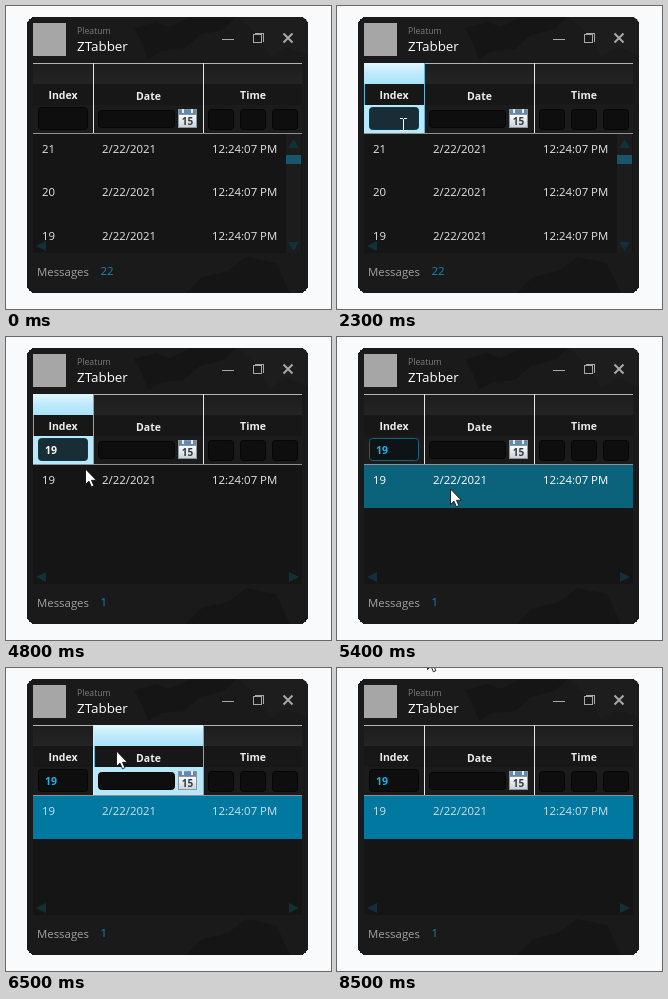
An HTML page for the animation above (8.6 s loop, 325 by 303 pixels).

```html
<!DOCTYPE html>
<html lang="en">
<head>
<meta charset="utf-8">
<title>Message log</title>
<style>
  html, body { margin: 0; width: 100%; height: 100%; overflow: hidden; background: #f9fafc; }
  svg { display: block; width: 325px; height: 303px; }
  text { font: 11.4px "Open Sans", "Noto Sans", sans-serif; fill: #e6e6e6; white-space: pre; }
  rect, .crisp { shape-rendering: crispEdges; }
  .head { font-size: 10.5px; font-weight: 700; fill: #ececec; text-anchor: middle; }
  .box { fill: #0e0e0e; stroke: #060606; shape-rendering: auto; }
  .arrow { fill: #12303a; }
  .count { fill: #1088b4; }
  #typed { font-size: 10.5px; font-weight: 700; }
</style>
</head>
<body>
<svg viewBox="0 0 325 303">
  <defs>
    <linearGradient id="top" x2="0" y2="1">
      <stop offset="0" stop-color="#e2f7ff"/>
      <stop offset=".5" stop-color="#bdeafc"/>
      <stop offset="1" stop-color="#a9e3fa"/>
    </linearGradient>
    <linearGradient id="strip" x2="0" y2="1">
      <stop offset="0" stop-color="#1d1d1d"/>
      <stop offset="1" stop-color="#242424"/>
    </linearGradient>
    <linearGradient id="page" x2="0" y2="1">
      <stop offset="0" stop-color="#fafcfd"/>
      <stop offset="1" stop-color="#ccd3d9"/>
    </linearGradient>
    <clipPath id="frame"><rect x="21" y="11" width="281" height="276" rx="8"/></clipPath>
  </defs>

  <!-- window -->
  <rect x="21" y="11" width="281" height="276" rx="8" fill="#1a1a1a"/>
  <g clip-path="url(#frame)">
    <g fill="#151515">
      <path d="M128 22l22-6 14 5 20-10h46l-12 12-24 6-16 14-22 2-14 8-6-16z"/>
      <path d="M180 287l16-16 26-6 18-14 30 6 14 30z"/>
    </g>
    <path fill="#1d1d1d" d="M232 11h70v38l-22-8-16 10-12-22z"/>
  </g>
  <rect x="27" y="17" width="33" height="33" fill="#a6a6a6"/>
  <text x="71" y="28" style="font-size:8.7px;fill:#7c7c7c">Pleatum</text>
  <text x="71" y="45" style="font-size:13.4px;fill:#fff">ZTabber</text>
  <g fill="none" stroke="#a8a8a8">
    <path class="crisp" d="M216 33.5h12"/>
    <path class="crisp" d="M247.500 28.500h8v8h-8zM249 27.500h8v8"/>
    <path d="M277.500 27.500l9 9M286.500 27.500l-9 9" stroke-width="2"/>
  </g>

  <!-- table header -->
  <rect x="27" y="57" width="269" height="190" fill="#151515"/>
  <rect x="27" y="57" width="269" height="21" fill="url(#strip)"/>
  <rect x="27" y="78" width="269" height="21" fill="#171717"/>
  <rect x="27" y="99" width="269" height="28" fill="#1b1b1b"/>
  <path class="crisp" d="M27 57.5h269" stroke="#b4b4b4"/>
  <path class="crisp" d="M27 127.5h269" stroke="#909090"/>
  <path class="crisp" d="M87.500 57v70M197.500 57v70" stroke="#e6e6e6"/>
  <g id="hoverIndex"></g>
  <g id="hoverDate"></g>
  <text class="head" x="57" y="93">Index</text>
  <text class="head" x="142.500" y="94">Date</text>
  <text class="head" x="247" y="93">Time</text>
  <rect id="field" class="box" x="32.500" y="101.500" width="49" height="22" rx="3"/>
  <rect class="box" x="92.500" y="104.500" width="76" height="17" rx="3"/>
  <rect class="box" x="202.500" y="103.500" width="25" height="20" rx="3"/>
  <rect class="box" x="234.500" y="103.500" width="25" height="20" rx="3"/>
  <rect class="box" x="266.500" y="103.500" width="25" height="20" rx="3"/>
  <g>
    <rect x="172" y="103" width="19" height="19" fill="#8d969e"/>
    <rect x="173" y="109" width="17" height="12" fill="url(#page)"/>
    <rect x="173" y="104" width="17" height="4" fill="#5f8bb3"/>
    <path class="crisp" d="M177 103v4M186 103v4" stroke="#e6ecf1" stroke-width="2"/>
    <text x="181.500" y="119" text-anchor="middle" style="font-size:10px;font-weight:700;fill:#333a42">15</text>
  </g>
  <text id="typed" x="39" y="117"></text>
  <rect id="caret" y="107" width="1" height="12" fill="#fff"/>

  <!-- list -->
  <rect id="mark" x="27" y="128" width="269" height="43"/>
  <g id="rows"></g>
  <path class="arrow" d="M40 235v10l-10-5z"/>
  <path id="right" class="arrow" d="M283 235v10l10-5z"/>
  <g id="scroll">
    <rect x="280" y="128" width="15" height="119" fill="#1c1c1c"/>
    <path class="arrow" d="M282 142h11l-5.500-9z"/>
    <path class="arrow" d="M282 236h11l-5.500 9z"/>
    <rect id="thumb" x="280" y="149" width="15" fill="#17566c"/>
  </g>
  <text x="31" y="270" style="fill:#a2a2a2">Messages</text>
  <text id="count" class="count" x="94.500" y="269"></text>

  <!-- pointers -->
  <path id="arrow" d="M.5 1v15.500l3.500-3.300 2.400 5.600 2.500-1.100-2.400-5.400h4.900z" fill="#fff" stroke="#111" stroke-width=".9"/>
  <path id="beam" class="crisp" d="M-3-5.500H0M1-5.500H4M.5-5V6M-3 6.500H0M1 6.500H4" fill="none" stroke="#fff"/>
</svg>
<script>
const LOOP = 8600, STEP = 100;
const $ = id => document.getElementById(id);
const show = (el, on) => el.style.display = on ? '' : 'none';

// Value of the last entry whose time has come
const at = (track, t) => {
  let value = track[0][1];
  for (const [time, v] of track) if (t >= time) value = v;
  return value;
};

// Pointer: x, y and whether it is a text beam
const path = [
  [0, null],
  [500, [76, 8]], [600, [75, 20]], [700, [73, 38]], [800, [71, 62]],
  [900, [69, 86]], [1000, [67, 109, 1]], [1100, [66, 118, 1]],
  [4700, [70, 123, 1]], [4800, [79, 131]], [4900, [100, 155]],
  [5100, [109, 158]], [5200, [113, 151]],
  [6200, [114, 148]], [6300, [113, 133]], [6400, [112, 112, 1]],
  [6500, [110, 82]], [6600, [108, 53]], [6700, [106, 26]],
  [6800, [104, 2]], [6900, null],
  [8100, [105, -16]], [8200, [102, -15]], [8300, [98, -15]],
  [8400, [94, -15]], [8500, [90, -15]]
];
const hover = [[0, ''], [800, 'index'], [4900, ''], [6400, 'date'], [6600, '']];
const typed = [[0, ''], [2800, '1'], [3200, '19']];
const query = [[0, ''], [2900, '1'], [3200, '19']];
const caret = [[0, 0], [1900, 1], [2300, 0], [2800, 1], [3800, 0], [4200, 1], [4700, 0]];
const rowText = [[0, '#e6e6e6'], [4900, '#fff'], [6400, '#cfe0e8']];
const rowFill = [[0, 'none'], [5400, '#0a627b'], [5500, '#056d8e'], [5600, '#0078a0']];
// Filter field: fill, border, text
const field = [
  [0, ['#0e0e0e', '#060606', '#fff']],
  [1800, ['#13212a', '#0c2a36', '#fff']],
  [1900, ['#182d36', '#0f3a48', '#fff']],
  [5200, ['#0f1e24', '#1b6a82', '#8fd4ee']],
  [5400, ['#0e1316', '#15647f', '#18b4e6']],
  [5500, ['#0e0f10', '#10303b', '#18b4e6']],
  [5600, ['#0e0e0e', '#060606', '#18b4e6']]
];

const glow = (x, w) => `
  <rect x="${x}" y="57" width="${w}" height="21" fill="url(#top)"/>
  <rect x="${x}" y="99" width="${w}" height="28" fill="#b6e9fc"/>
  <rect x="${x}" y="78" width="1" height="21" fill="#62b4d6"/>
  <rect x="${x + w - 1}" y="57" width="1" height="70" fill="#62b4d6"/>`;
$('hoverIndex').innerHTML = glow(27, 61);
$('hoverDate').innerHTML = glow(88, 110);

const cell = (x, y, s) => `<text x="${x}" y="${y}">${s}</text>`;
const messages = Array.from({ length: 22 }, (_, i) => String(21 - i));
let lastQuery = null;

function filter(q) {
  if (q === lastQuery) return;
  lastQuery = q;
  const found = messages.filter(m => m.includes(q));
  $('rows').innerHTML = found.slice(0, 3).map((m, i) => {
    const y = 147 + Math.floor(i * 43.5);
    return cell(36, y, m) + cell(96, y, '2/22/2021') + cell(206, y, '12:24:07 PM');
  }).join('');
  $('count').textContent = found.length;
  $('thumb').setAttribute('height', Math.round(82 * 119 / (found.length * 43)) - 1);
  show($('scroll'), found.length > 2);
  show($('right'), found.length <= 2);
}

function point(pos) {
  const beam = pos && pos[2];
  show($('arrow'), pos && !beam);
  show($('beam'), beam);
  if (pos) $(beam ? 'beam' : 'arrow').setAttribute('transform', `translate(${pos[0]} ${pos[1]})`);
}

function draw(t) {
  const [fill, border, ink] = at(field, t);
  $('field').style.fill = fill;
  $('field').style.stroke = border;
  $('typed').style.fill = ink;
  const word = at(typed, t);
  $('typed').textContent = word;
  $('caret').setAttribute('x', 39 + word.length * 6);
  show($('caret'), at(caret, t));
  const over = at(hover, t);
  show($('hoverIndex'), over === 'index');
  show($('hoverDate'), over === 'date');
  filter(at(query, t));
  $('mark').style.fill = at(rowFill, t);
  for (const el of $('rows').children) el.style.fill = at(rowText, t);
  point(at(path, t));
}

let start = null;
function tick(now) {
  if (start === null) start = now;
  draw(Math.floor(((now - start) % LOOP) / STEP) * STEP);
  requestAnimationFrame(tick);
}
draw(0);
requestAnimationFrame(tick);
</script>
</body>
</html>
```
